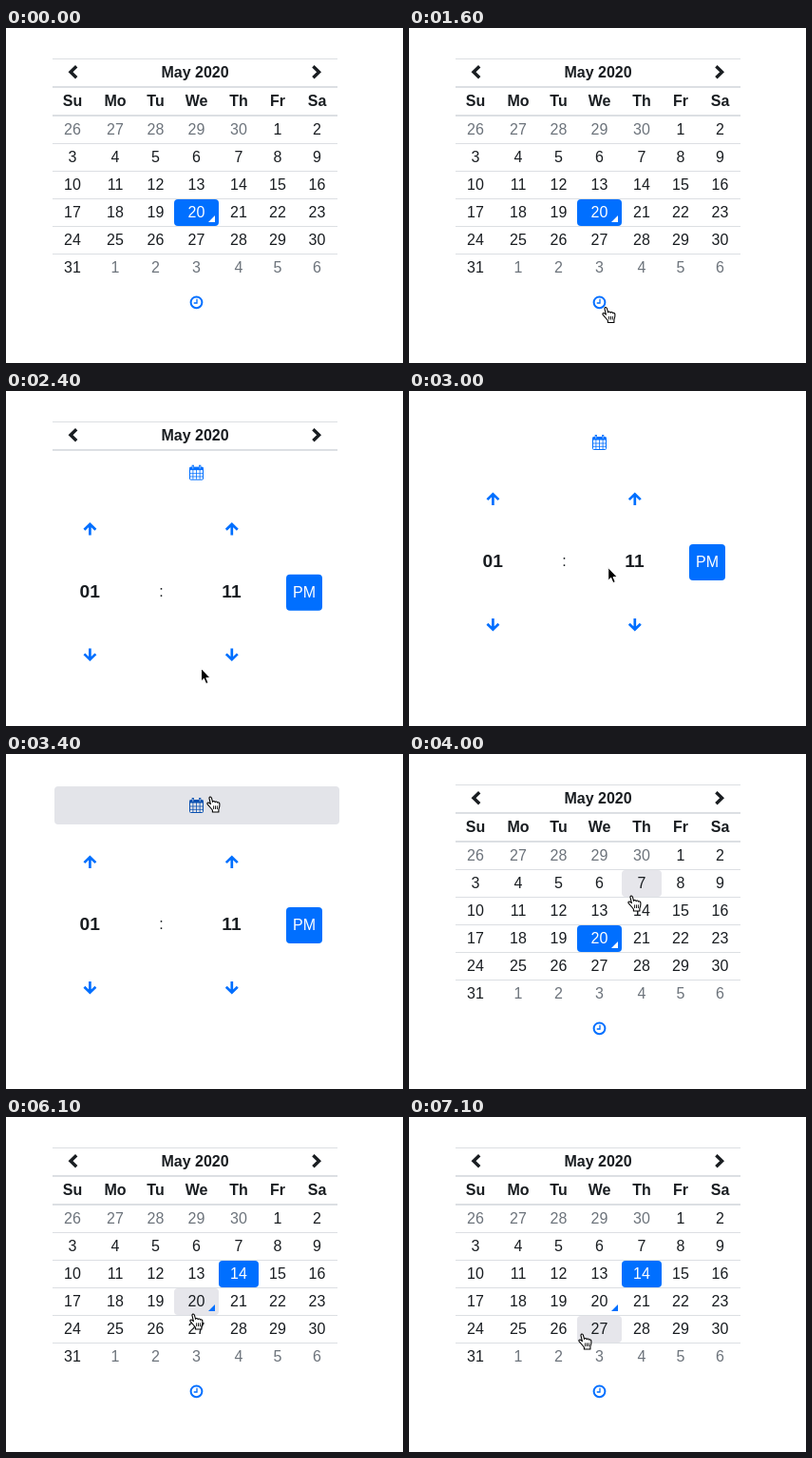
An HTML page that plays this animation: 418 px wide and 352 px high, repeating every 7300 ms.

```html
<!DOCTYPE html>
<html lang="en">
<head>
<meta charset="utf-8">
<title>Date and time picker</title>
<style>
  html, body { margin: 0; width: 100%; height: 100%; overflow: hidden; background: #fff; }
  svg { display: block; width: 418px; height: 352px; }
  text { font: 16px "Liberation Sans", Arial, sans-serif; fill: #191d21; text-anchor: middle; }
  .bold { font-weight: bold; }
  .digits { font-size: 19.2px; font-weight: bold; }
  .muted { fill: #6c737b; }
  .white { fill: #fff; }
  .rule { fill: #dcdfe3; }
  .chevron { fill: none; stroke: #191d21; stroke-width: 3.4; }
  .blue { fill: #006fff; }
  .arrow { fill: none; stroke: #006fff; stroke-width: 2.7; }
</style>
</head>
<body>
<svg viewBox="0 0 418 352">
  <defs>
    <clipPath id="dateClip"><rect id="dateWindow" x="40" y="32" width="320"/></clipPath>
    <clipPath id="timeClip"><rect id="timeWindow" x="40" y="40" width="320"/></clipPath>
    <path id="up" class="arrow" d="M-6 .6 L0 -5.2 L6 .6 M0 -4.4 V6.4"/>
  </defs>

  <g clip-path="url(#dateClip)">
    <g id="rules" class="rule"></g>
    <path class="chevron" d="M74.2 40.3 L68 46.3 L74.2 52.3 M323.4 40.3 L329.6 46.3 L323.4 52.3"/>
    <text class="bold" x="199" y="52">May 2020</text>
    <rect id="hover" width="40" height="28" rx="4" fill="#e6e6eb"/>
    <rect id="picked" class="blue" height="28" rx="4"/>
    <g id="days"></g>
    <path id="today" d="M220 197 V204 H213 Z"/>
  </g>

  <g id="lower">
    <rect id="button" x="51" width="300" height="40" rx="4" fill="#e3e4e9"/>
    <g id="clock" transform="translate(200.5 20.3)" fill="none" stroke="currentColor">
      <circle r="5.9" stroke-width="2"/>
      <path d="M.5 -3.6 V.7 H-2.8" stroke-width="1.3"/>
    </g>
    <g id="calendar" transform="translate(200.5 20)" fill="none" stroke="currentColor">
      <rect x="-7" y="-5.5" width="14" height="13" rx="1"/>
      <path d="M-7 -4 H7" stroke-width="3"/>
      <path d="M-7 1 H7 M-7 4.3 H7 M-3.6 -3 V7 M0 -3 V7 M3.6 -3 V7" stroke-width=".8"/>
      <path d="M-3.7 -8 V-3.6 M3.7 -8 V-3.6" stroke-width="2.2"/>
      <path d="M-3.7 -7 V-4 M3.7 -7 V-4" stroke="#fff" stroke-width=".6"/>
    </g>
    <g id="time" clip-path="url(#timeClip)">
      <use href="#up" x="88.4" y="79.5"/>
      <use href="#up" x="237.8" y="79.5"/>
      <use href="#up" transform="translate(88.4 211.3) scale(1 -1)"/>
      <use href="#up" transform="translate(237.8 211.3) scale(1 -1)"/>
      <text class="digits" x="88.2" y="151">01</text>
      <text x="163.5" y="150">:</text>
      <text class="digits" x="237.5" y="151">11</text>
      <rect class="blue" x="295" y="127" width="38" height="38" rx="4"/>
      <text class="white" x="314" y="151">PM</text>
    </g>
  </g>

  <g id="cursor" stroke-linejoin="round">
    <path id="pointer" d="M.5 .5 V14 L3.4 11.3 L5.6 16.6 L8 15.6 L5.8 10.5 H10 Z" fill="#000" stroke="#fff"/>
    <g id="hand" transform="translate(-2 1.5)" stroke="#000" stroke-width="1.1">
      <path fill="#fff" d="M4.8 13 L1.2 8.9 C.2 7.4 1.8 6.4 3.2 7.6 L4.4 8.6 L3 2.6 C2.7 .8 4.9 .5 5.4 2.2 L6.6 6.4 C7 5.2 8.8 5.3 9.1 6.6 C9.8 5.6 11.3 5.9 11.6 7.1 C12.5 6.4 13.8 7 13.9 8.4 C14.2 11.2 13.4 12.8 12.9 14.2 V17 H6.4 V15 Z"/>
      <path fill="none" stroke-width=".9" d="M7.6 10.4 V14 M9.5 10.4 V14 M11.4 10.4 V14"/>
    </g>
  </g>
</svg>

<script>
const LOOP = 7300, STEP = 100;
const DATE_HEIGHT = 234, TIME_HEIGHT = 207, TOP = 34;
const columnEdges = [49, 92, 137, 177, 224, 266, 307, 349];
const columnCenters = [70, 115, 157.5, 200.5, 245, 286, 327.5];
const TODAY = 24, CHOSEN = 18;   // cell indexes, counted from April 26

// Each track is a list of [time, ...values]
const cursorTrack = [
  [900, 181, 340], [1400, 205, 291], [2500, 205, 291], [2900, 208, 234],
  [3300, 213, 38], [3400, 213, 42.5], [3600, 213, 42.5], [4000, 232, 146.5],
  [4300, 240, 156], [4700, 240, 156], [5200, 241, 175.5], [5400, 241, 175.5],
  [6100, 195, 204.5], [6400, 195, 204.5], [7100, 180, 225.5]
];
const buttonTrack = [
  [1600, 0], [1800, 1], [2200, 1], [2400, 0],
  [3100, 0], [3300, 1], [3600, 1], [3800, 0]
];

const $ = id => document.getElementById(id);
const clamp = v => Math.max(0, Math.min(1, v));
const show = (id, on) => { $(id).style.display = on ? "" : "none"; };

function set(id, attributes) {
  for (const name in attributes) $(id).setAttribute(name, attributes[name]);
}

function add(parent, tag, attributes, content = "") {
  const node = document.createElementNS("http://www.w3.org/2000/svg", tag);
  for (const name in attributes) node.setAttribute(name, attributes[name]);
  node.textContent = content;
  $(parent).append(node);
  return node;
}

function sample(track, t) {
  const next = track.findIndex(point => point[0] > t);
  if (next === 0) return track[0].slice(1);
  if (next < 0) return track[track.length - 1].slice(1);
  const a = track[next - 1], b = track[next];
  const u = (t - a[0]) / (b[0] - a[0]);
  return a.slice(1).map((v, i) => v + (b[i + 1] - v) * u);
}

// CSS "ease": cubic-bezier(.25, .1, .25, 1)
function ease(x) {
  if (x <= 0 || x >= 1) return clamp(x);
  const curve = (s, p, q) => 3 * p * s * (1 - s) ** 2 + 3 * q * s * s * (1 - s) + s ** 3;
  let low = 0, high = 1;
  for (let i = 0; i < 24; i++) {
    const mid = (low + high) / 2;
    if (curve(mid, .25, .25) < x) low = mid; else high = mid;
  }
  return curve(low, .1, 1);
}

function cellBox(index) {
  const col = index % 7, row = Math.floor(index / 7);
  return { x: columnEdges[col], y: 93 + row * 29, width: columnEdges[col + 1] - columnEdges[col] };
}

function cellAt(x, y) {
  const col = columnEdges.findIndex(edge => edge > x) - 1;
  const row = Math.floor((y - 92.5) / 29);
  return col >= 0 && row >= 0 && row < 6 ? row * 7 + col : -1;
}

const rule = (y, height) => add("rules", "rect", { x: 49, y, width: 300, height });
rule(32, 1);
rule(61, 2);
rule(91, 2);
for (let row = 1; row < 6; row++) rule(92 + row * 29, 1);

["Su", "Mo", "Tu", "We", "Th", "Fr", "Sa"].forEach((name, col) =>
  add("days", "text", { class: "bold", x: columnCenters[col], y: 82 }, name));

const dayLabels = Array.from({ length: 42 }, (_, i) => {
  const day = i < 5 ? 26 + i : (i - 5) % 31 + 1;
  return add("days", "text", {
    class: i < 5 || i > 35 ? "muted" : "",
    x: columnCenters[i % 7],
    y: 112 + Math.floor(i / 7) * 29
  }, day);
});

function draw(t) {
  const opened = ease((t - 2200) / 350) - ease((t - 3600) / 350);
  const dateHeight = DATE_HEIGHT * (1 - opened);
  const timeMode = t >= 2200 && t < 3600;

  set("dateWindow", { height: dateHeight });
  set("timeWindow", { height: TIME_HEIGHT * opened });
  set("lower", { transform: `translate(0 ${TOP + dateHeight})` });

  const [glow] = sample(buttonTrack, t);
  set("button", { opacity: glow });
  $("lower").style.color = `color-mix(in srgb, #0a50b0 ${glow * 100}%, #006fff)`;
  show("clock", !timeMode);
  show("calendar", timeMode);

  const [x, y] = sample(cursorTrack, t);
  const pointing = t >= 1600 && t < 2200 || t >= 3200;
  set("cursor", { transform: `translate(${x} ${y})` });
  show("cursor", t >= 900);
  show("hand", pointing);
  show("pointer", !pointing);

  const picked = t < 5000 ? TODAY : CHOSEN;
  const hovered = t >= 3900 ? cellAt(x + 3, y + 2) : -1;
  set("picked", cellBox(picked));
  show("hover", hovered >= 0);
  if (hovered >= 0) set("hover", cellBox(hovered));
  [TODAY, CHOSEN].forEach(i => dayLabels[i].classList.toggle("white", i === picked));
  set("today", { fill: picked === TODAY ? "#fff" : "#006fff" });
}

const start = performance.now();
function tick() {
  const t = (performance.now() - start) % LOOP;
  draw(Math.floor(t / STEP) * STEP);
  requestAnimationFrame(tick);
}
tick();
</script>
</body>
</html>
```
